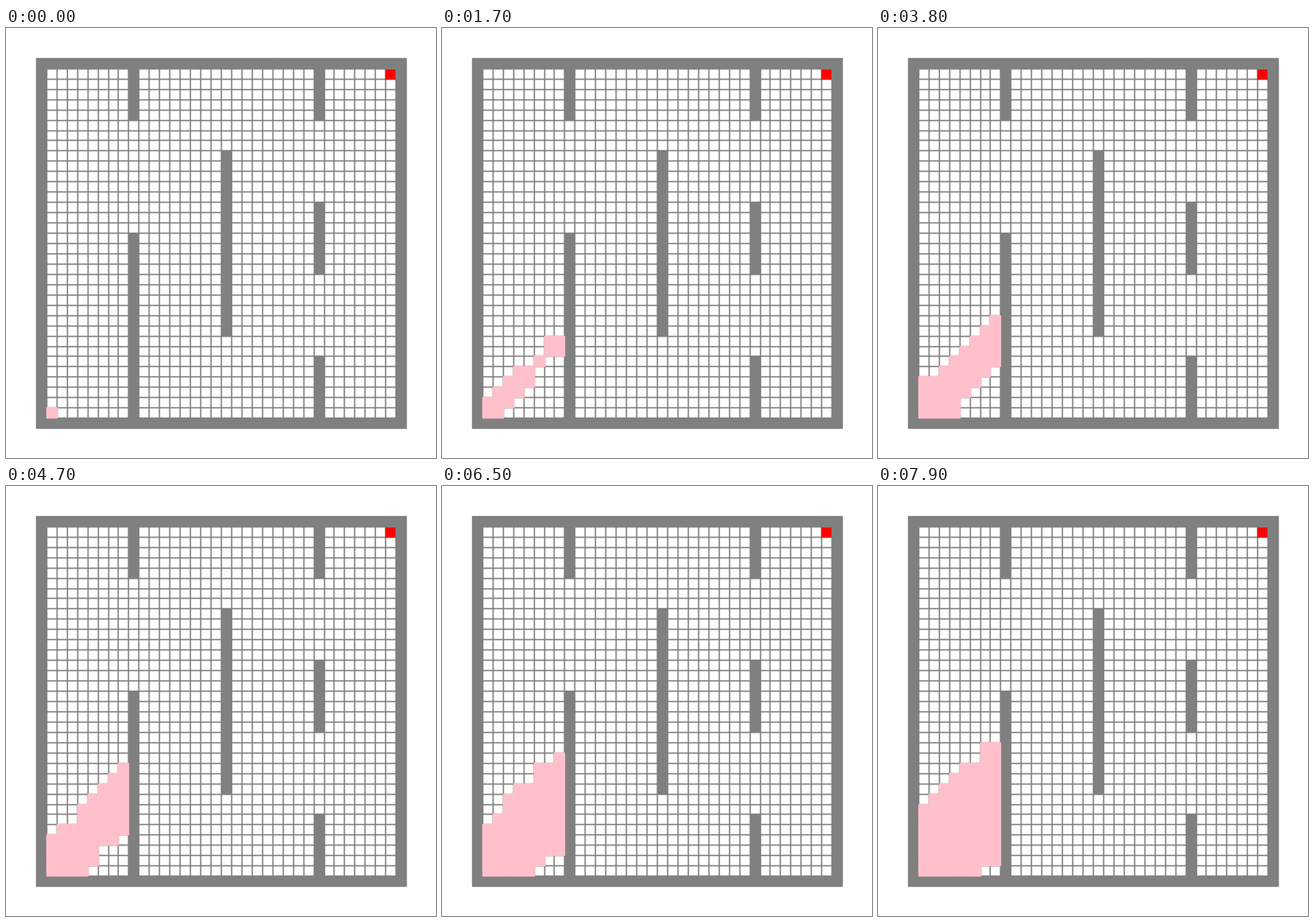
A matplotlib script for the animation above (8000 ms loop, 500 by 500 pixels).

```python
from itertools import product
from math import sqrt

import matplotlib.pyplot as plt
from matplotlib.animation import FuncAnimation
from matplotlib.collections import PolyCollection

SIZE = 36                   # cells per side, border included
ORIGIN, PITCH = 34.83, 11.954
FRAMES, INTERVAL = 80, 100
START, GOAL = (1, 1), (34, 34)
LAST = SIZE - 1

# column, first row, last row
BARS = [(9, 1, 18), (9, 30, 34), (18, 9, 26),
        (27, 1, 6), (27, 15, 21), (27, 30, 34)]


def build_walls():
    walls = {c for c in product(range(SIZE), repeat=2)
             if 0 in c or LAST in c}
    for col, low, high in BARS:
        walls |= {(col, row) for row in range(low, high + 1)}
    return walls


def octile(cell):
    dx, dy = GOAL[0] - cell[0], GOAL[1] - cell[1]
    dx, dy = abs(dx), abs(dy)
    return (dx + dy) + (sqrt(2) - 2) * min(dx, dy)


def explore(walls, count):
    """A* expansion order; ties go to the cell discovered first."""
    cost = {START: 0.0}
    frontier = {START: octile(START)}
    visited = []
    closed = set()
    while frontier and len(visited) < count:
        cell = min(frontier, key=frontier.get)
        del frontier[cell]
        closed.add(cell)
        visited.append(cell)
        for dx, dy in product((-1, 0, 1), repeat=2):
            near = cell[0] + dx, cell[1] + dy
            if near in walls or near in closed:
                continue
            g = cost[cell] + (sqrt(2) if dx and dy else 1)
            f = g + octile(near)
            if near not in frontier or f < frontier[near]:
                cost[near] = g
                frontier[near] = f
    return visited


def square(cell):
    x, y = (ORIGIN + PITCH * c for c in cell)
    return [(x, y), (x + PITCH, y), (x + PITCH, y + PITCH), (x, y + PITCH)]


walls = build_walls()
trail = [square(c) for c in explore(walls, FRAMES)]

fig = plt.figure(figsize=(5, 5), dpi=100, facecolor="white")
ax = fig.add_axes([0, 0, 1, 1])
ax.set(xlim=(0, 500), ylim=(0, 500))
ax.axis("off")

cells = list(product(range(SIZE), repeat=2))
faces = ["red" if c == GOAL else "gray" if c in walls else "white"
         for c in cells]
edges = ["red" if c == GOAL else "gray" for c in cells]
ax.add_collection(PolyCollection([square(c) for c in cells], facecolors=faces,
                                 edgecolors=edges, linewidths=1))
pink = PolyCollection(trail[:1], facecolors="pink", edgecolors="pink",
                      linewidths=1, zorder=3)
ax.add_collection(pink)


def update(i):
    pink.set_verts(trail[:i + 1])
    return [pink]


anim = FuncAnimation(fig, update, frames=FRAMES, interval=INTERVAL,
                     repeat=True, repeat_delay=0)
plt.show()
```
